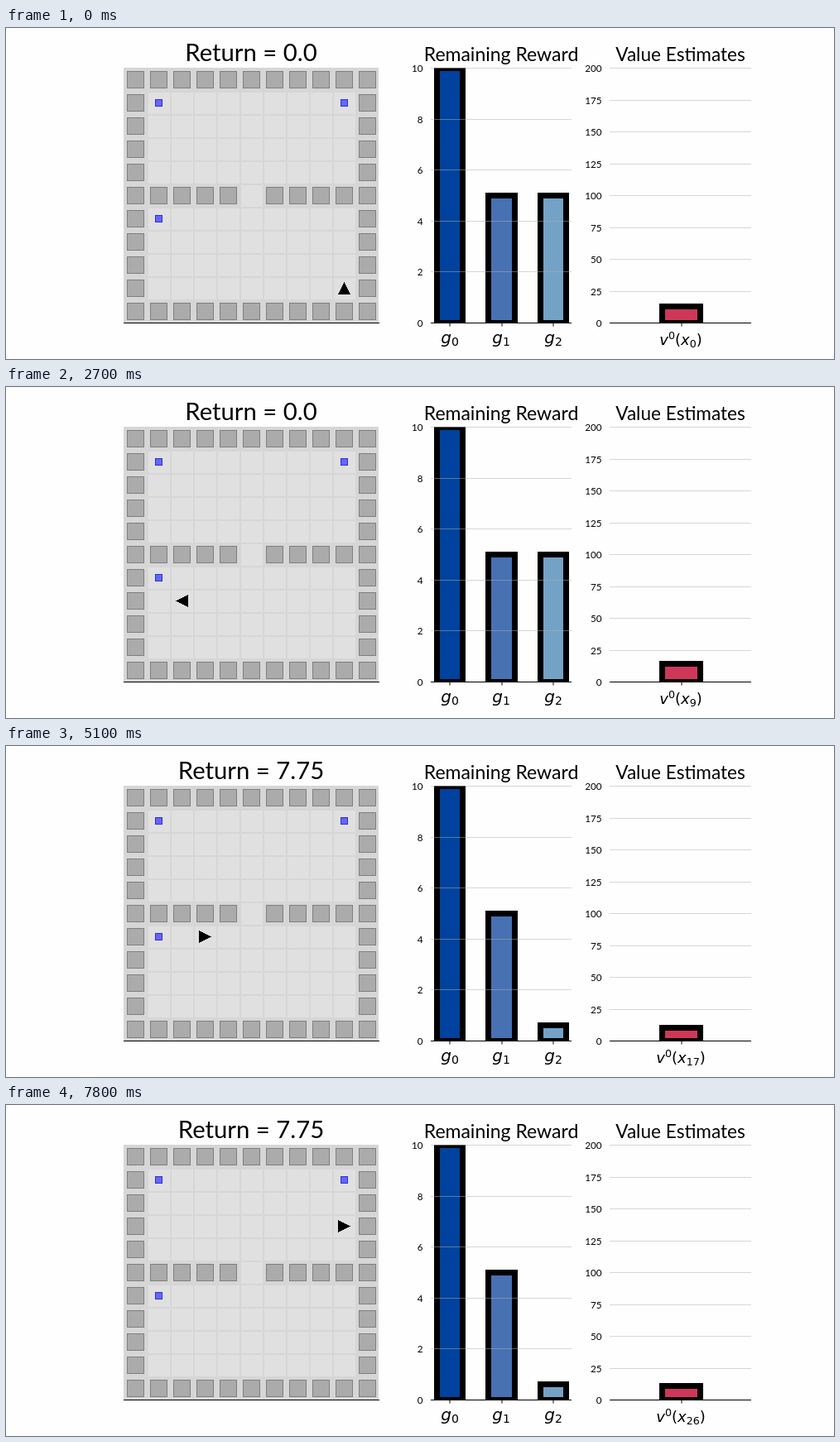
An HTML page with a canvas for the animation above (8 s loop, 1000x400 px).

```html
<!DOCTYPE html>
<html lang="en">
<head>
<meta charset="utf-8">
<title>Grid world with decaying rewards</title>
<style>
html, body { margin: 0; width: 100%; height: 100%; overflow: hidden; background: #fefefe; }
canvas { display: block; }
</style>
</head>
<body>
<canvas id="stage" width="1000" height="400"></canvas>
<script>
const ctx = document.getElementById("stage").getContext("2d");
const LOOP = 8000, STEP = 300, CELL = 28, TOP = 48.5, BASE = 356.5;
const SANS = "Lato, 'Gill Sans', sans-serif";
const MATH = "'DejaVu Sans', sans-serif";
const MOVES = "ULULLLLLLLURLRLRRRRUUURRRR";
const DIRS = { U: [0, -1, 0], R: [1, 0, 1], L: [-1, 0, 3] }; // dx, dy, quarter turns
const GOODS = [[1, 1], [9, 1], [1, 6]];
const GAMMA = 0.99;

const cx = col => 156.5 + CELL * col;
const cy = row => 62.5 + CELL * row;
const isWall = (c, r) => c % 10 === 0 || r % 10 === 0 || (r === 5 && c !== 5);

// Replay the walk once; each visit to the lower-left good halves what it still gives.
function simulate() {
  let s = { col: 9, row: 9, turn: 0, total: 0, left: 5, value: 12.8 };
  const states = [s];
  [...MOVES].forEach((move, i) => {
    const [dx, dy, turn] = DIRS[move];
    s = { ...s, col: s.col + dx, row: s.row + dy, turn, value: s.value / GAMMA };
    if (s.col === 1 && s.row === 6) {
      s.total += s.left * GAMMA ** (i + 1);
      s.value -= s.left * 0.54;
      s.left /= 2;
    }
    states.push(s);
  });
  return states;
}
const states = simulate();

function rect(x, y, w, h, color) {
  ctx.fillStyle = color;
  ctx.fillRect(x, y, w, h);
}

function text(str, x, y, size, align = "center") {
  ctx.font = `${size}px ${SANS}`;
  ctx.textAlign = align;
  ctx.fillStyle = "#000";
  ctx.fillText(str, x, y);
}

// Parts are [string, italic, script]: script 1 is raised, -1 lowered, 0 plain.
function formula(parts, x, y, size) {
  const fontOf = ([, italic, script]) =>
    `${italic ? "italic " : ""}${script ? size * 0.7 : size}px ${MATH}`;
  const widths = parts.map(p => {
    ctx.font = fontOf(p);
    return ctx.measureText(p[0]).width;
  });
  x -= widths.reduce((a, b) => a + b) / 2;
  ctx.textAlign = "left";
  ctx.fillStyle = "#000";
  parts.forEach((p, i) => {
    ctx.font = fontOf(p);
    ctx.fillText(p[0], x, y + [3.3, 0, -7][p[2] + 1]);
    x += widths[i];
  });
}

function box(x, y, size, fill, edge) {
  rect(x - size / 2, y - size / 2, size, size, edge);
  rect(x - size / 2 + 1, y - size / 2 + 1, size - 2, size - 2, fill);
}

function agent({ col, row, turn }) {
  ctx.save();
  ctx.translate(cx(col), cy(row));
  ctx.rotate(turn * Math.PI / 2);
  for (let i = 0; i < 8; i++) rect(-0.5 - i, -7.5 + 2 * i, 1 + 2 * i, i < 7 ? 2 : 1, "#000");
  ctx.restore();
}

function world(s) {
  rect(142, 48, 308, 308, "#d6d6d6");
  for (let r = 0; r < 11; r++) {
    for (let c = 0; c < 11; c++) {
      if (isWall(c, r)) box(cx(c), cy(r), 21, "#ababab", "#7f7f7f");
      else rect(cx(c) - 12.5, cy(r) - 12.5, 26, 26, "#e0e0e0");
    }
  }
  for (const [c, r] of GOODS) {
    if (c !== s.col || r !== s.row) box(cx(c), cy(r), 9, "#6565ff", "#3030d0");
  }
  agent(s);
  rect(142, 356, 309, 1, "#000");
}

function bar(x, w, value, max, color) {
  const y = Math.round(BASE - 308 * value / max - 3.5);
  ctx.save();
  ctx.beginPath();
  ctx.rect(x, 48, w, 309);
  ctx.clip();
  rect(x, y, w, 400 - y, "#000");
  rect(x + 7, y + 7, w - 14, 346 - y, color);
  ctx.restore();
  rect(Math.round(x + w / 2) - 0.5, 357, 1, 3.5, "#000");
}

function axes(x, w, max, step, labelX) {
  for (let v = 0; v <= max; v += step) {
    const y = Math.floor(BASE - 308 * v / max);
    rect(x, y, w, 1, "rgba(176,176,176,0.5)");
    text(v, labelX, y + 4.5, 11.7, "right");
  }
  rect(x, 356, w, 1, "#000");
}

function draw(now) {
  const k = Math.min(MOVES.length, Math.floor((now % LOOP) / STEP));
  const s = states[k];
  rect(0, 0, 1000, 400, "#fefefe");

  world(s);
  text(`Return = ${s.total ? s.total.toFixed(2) : "0.0"}`, 296, 40, 29.3);

  bar(517, 38, 10, 10, "#00429d");
  bar(579, 39, 5, 10, "#4771b2");
  bar(642, 38, s.left, 10, "#73a2c6");
  axes(513, 170, 10, 2, 503.5);
  [536, 598, 661].forEach((x, i) => formula([["g", 1, 0], [i, 0, -1]], x, 381, 20));
  text("Remaining Reward", 598, 40, 23);

  bar(789, 53, s.value, 200, "#cf3759");
  axes(729, 171, 200, 25, 719.5);
  formula([["v", 1, 0], ["0", 0, 1], ["(", 0, 0], ["x", 1, 0], [k, 0, -1], [")", 0, 0]], 815, 383, 18);
  text("Value Estimates", 814.5, 40, 22.6);
}

const start = performance.now();
(function tick() {
  draw(performance.now() - start);
  requestAnimationFrame(tick);
})();
</script>
</body>
</html>
```
